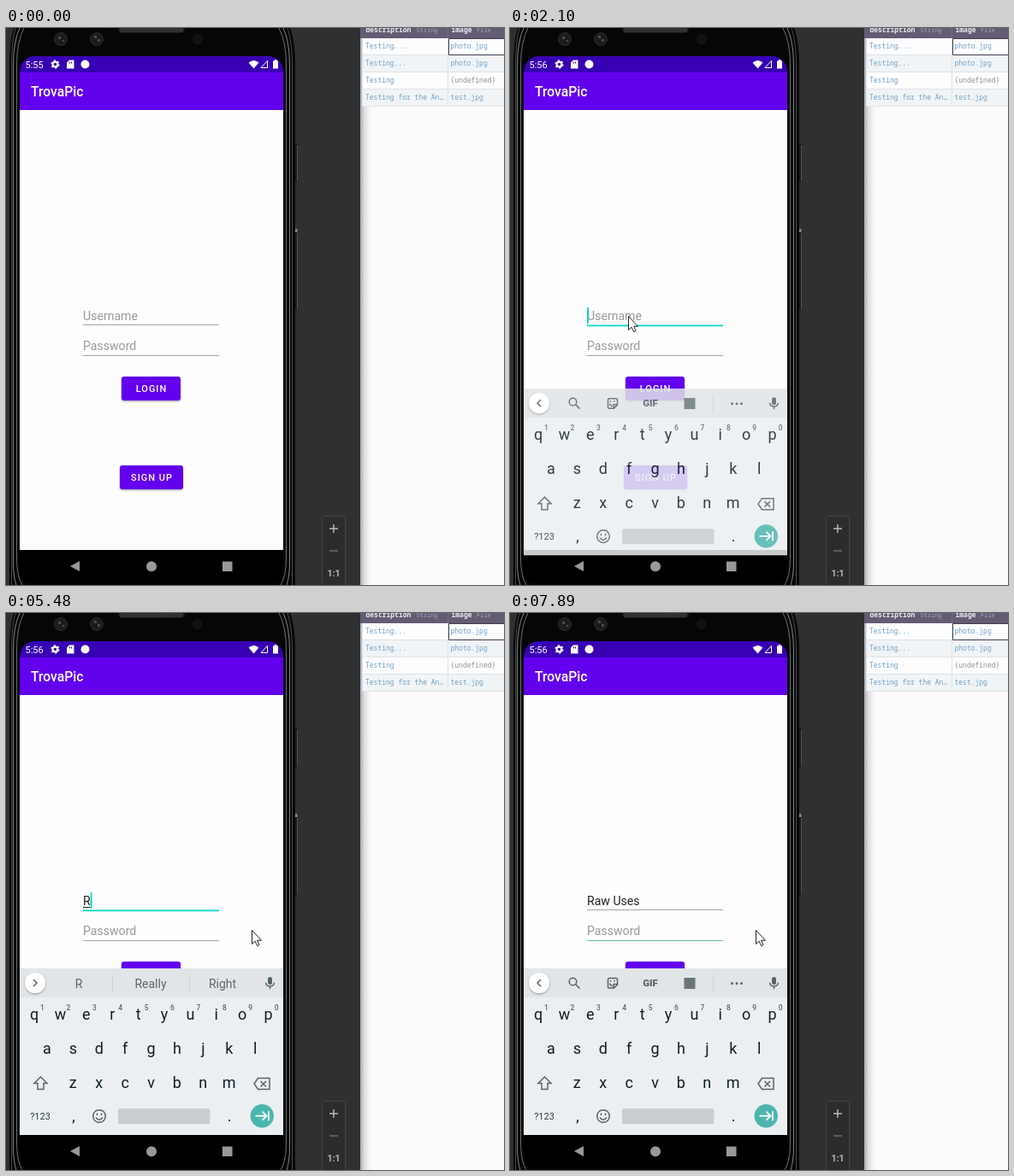
Write an HTML page that moves like this. It is 582 by 652 pixels and loops after 8 s.

```html
<!DOCTYPE html>
<html lang="en">
<head>
<meta charset="utf-8">
<title>Login screen</title>
<style>
html, body { margin: 0; width: 100%; height: 100%; overflow: hidden; background: #2f3032; }
svg { display: block; width: 582px; height: 652px; font-family: Roboto, sans-serif; }
text { white-space: pre; }
.mono { font: 500 8px "Noto Sans Mono", monospace; fill: #6f9fc4; }
.field { font-size: 14.1px; fill: #999; }
.button { font-size: 11px; font-weight: 500; letter-spacing: .98px; fill: #fff; text-anchor: middle; }
.key { font-size: 18px; fill: #0f1e27; text-anchor: middle; }
.digit { font-size: 8.5px; font-weight: 500; fill: #59646b; text-anchor: middle; }
.word { font-size: 14px; fill: #5b666d; text-anchor: middle; }
.line { fill: none; stroke: #57636a; stroke-width: 1.5; }
</style>
</head>
<body>
<svg viewBox="0 0 582 652">
  <defs>
    <linearGradient id="edge">
      <stop offset="0" stop-color="#aeacaf"/><stop offset=".4" stop-color="#e3e1e3"/>
      <stop offset="1" stop-color="#fcfafb"/>
    </linearGradient>
    <filter id="shadow" x="-10%" y="-20%" width="120%" height="160%">
      <feDropShadow dx="0" dy="1.2" stdDeviation="1" flood-opacity=".35"/>
    </filter>
    <pattern id="mesh" width="3" height="3" patternUnits="userSpaceOnUse">
      <path fill="#4a4a4a" d="M0 0h1.4v1.4H0zM1.5 1.5h1.4v1.4H1.5z"/>
    </pattern>
  </defs>

  <!-- Phone body -->
  <path fill="#191a1b" d="M338 135h3v45h-3zM338 235h3v95h-3z"/>
  <path fill="#8a8b8c" d="M338 235h2.5v4h-2.5z"/>
  <path fill="#555" d="M340 137h1v42h-1zM340 240h1v89h-1z"/>
  <path fill="#060606" d="M9 0Q4 16 4 44V652H338V44Q338 16 332 0Z"/>
  <g fill="none">
    <path stroke="#4b4c4d" d="M11 0Q6.500 16 6.500 44V652M329 0Q334.500 16 334.500 44V652"/>
    <path stroke="#858687" d="M16 0Q8.500 16 8.500 44V625Q8.500 642 12 652M324 0Q331.500 16 331.500 44V625Q331.500 642 328 652"/>
    <path stroke="#6c6d6e" d="M21 0Q12.500 16 12.500 44V620Q12.500 642 19 652M319 0Q327.500 16 327.500 44V620Q327.500 642 321 652"/>
  </g>
  <g fill="#1c1c1d" stroke="#2c2c2d">
    <circle cx="64" cy="13" r="7.500"/><circle cx="106" cy="13" r="7.500"/>
    <circle cx="224" cy="13" r="5.500" fill="#111" stroke="#161616"/>
  </g>
  <path fill="#4a4a4a" d="M61 10h3v3h-3zM66 14h2v2h-2zM103 9h3v3h-3zM107 13h3v3h-3z"/>
  <rect x="131" y="-6" width="78" height="12" rx="5" fill="#1b1b1b"/>
  <rect x="133" y="0" width="74" height="5" fill="url(#mesh)"/>

  <!-- App -->
  <path fill="#fefefe" d="M16 96H324V611H16z"/>
  <path fill="#3700b3" d="M16 52V51A18 18 0 0 1 34 33H306A18 18 0 0 1 324 51V52z"/>
  <path fill="#6200ee" d="M16 52H324V96H16z"/>
  <g fill="#fff">
    <text id="clock" x="22.500" y="46.700" font-size="11"></text>
    <circle cx="57.500" cy="42.500" r="2.800" fill="none" stroke="#fff" stroke-width="2.200"/>
    <circle cx="57.500" cy="42.500" r="4.500" fill="none" stroke="#fff" stroke-width="1.300" stroke-dasharray="2.300 2.412"/>
    <path fill-rule="evenodd" d="M74 37.500h5.500v10H71v-7zM74 39.500v2h1v-2zM76 39.500v2h1v-2z"/>
    <circle cx="92.500" cy="42.500" r="5"/>
    <path d="M283.500 40.500Q289.500 35.500 295.500 40.500L289.500 47.500z"/>
    <path fill="none" stroke="#fff" d="M298 46.500H305.500V38.500z"/>
    <path d="M312 38.500h1.500v-1.200h3v1.200H318v9h-6z"/>
    <text x="29" y="80.300" font-size="15.700" font-weight="500">TrovaPic</text>
  </g>
  <path id="userLine"/>
  <path id="passwordLine" d="M90 383H249v1H90z"/>
  <text id="user" class="field" x="90" y="342"></text>
  <text class="field" x="90" y="377">Password</text>
  <rect id="compose" y="344" height="1" fill="#222"/>
  <rect id="caret" width="1.800" height="19"/>
  <g fill="#6200ee" filter="url(#shadow)">
    <rect x="135" y="408" width="69" height="28" rx="3"/>
    <rect x="133" y="512" width="74" height="28" rx="3"/>
  </g>
  <text class="button" x="170" y="426">LOGIN</text>
  <text class="button" x="170.500" y="530">SIGN UP</text>

  <!-- Navigation bar -->
  <path d="M16 611H324V636Q324 650 310 650H30Q16 650 16 636z"/>
  <path fill="#97999b" d="M75 630L86 624V636zM253 624.500h11.500v11.500H253z"/>
  <circle cx="170" cy="630.300" r="6" fill="#97999b"/>

  <!-- Emulator zoom controls -->
  <rect x="369.500" y="571.500" width="27" height="90" rx="3" fill="#2b2c2d" stroke="#454647"/>
  <path stroke="#b9babb" stroke-width="1.500" d="M378 586H388M383 581V591"/>
  <path stroke="#6a6b6c" stroke-width="1.500" d="M378 612H388"/>
  <text x="383" y="641.500" font-size="10.500" font-weight="700" text-anchor="middle" fill="#b9babb">1:1</text>

  <!-- Data browser -->
  <path fill="#fcfafb" d="M414 0H582V652H414z"/>
  <path fill="#fdfdfe" d="M416 12H582V92H416z"/>
  <path fill="#f1f4f6" d="M416 32H582V52H416zM416 72H582V92H416z"/>
  <path fill="url(#edge)" d="M414 92h13V652h-13zM414 12h3v80h-3z"/>
  <path stroke="#dfe2e6" d="M416 31.500H582M416 51.500H582M416 71.500H582M416 91.500H582M416.500 12V92M516.500 12V92"/>
  <path fill="#635c73" d="M414 0H582V12H414z"/>
  <path stroke="#777085" d="M516.500 0V12"/>
  <path fill="none" stroke="#3f3e4c" d="M517.500 12.500H590V31.500H517.500z"/>
  <g id="table"></g>

  <!-- Keyboard -->
  <g id="keyboard">
    <path fill="#ebeff2" d="M16 416H324V611H16z"/>
    <path fill="#e1e5e8" d="M16 416H324V450H16z"/>
    <circle cx="34" cy="433" r="12" fill="#fff" filter="url(#shadow)"/>
    <path id="chevron" class="line" stroke-width="2"/>
    <g fill="#57636a">
      <rect x="306" y="426" width="5" height="9" rx="2.500"/>
      <path class="line" d="M303.500 432.500Q304 437 308.500 437T313.500 432.500M308.500 437V440"/>
    </g>
    <g id="tools">
      <circle class="line" cx="73.500" cy="431.500" r="4.300"/>
      <path class="line" d="M76.500 434.500L81.500 439.500M116 427.500h8q1.500 0 1.500 1.500v6l-4 4h-5.500q-1.500 0-1.500-1.500V429q0-1.500 1.500-1.500M125 434.500h-4v4M116.500 433.500q1 3 3 3M117.500 430v1.500M122 430v1.500"/>
      <text x="164" y="437" font-size="11.500" font-weight="900" text-anchor="middle" fill="#57636a">GIF</text>
      <rect x="203.500" y="427" width="13" height="13" fill="#6b767c"/>
      <path stroke="#cdd2d5" d="M237.500 424V443"/>
      <path stroke="#57636a" stroke-width="3" stroke-linecap="round" d="M259.500 433.500h0M265 433.500h0M270.500 433.500h0"/>
    </g>
    <g id="hints">
      <path stroke="#cdd2d5" d="M124.500 424V443M214.500 424V443"/>
      <text class="word" x="85" y="439"></text>
      <text class="word" x="169" y="439"></text>
      <text class="word" x="253" y="439"></text>
    </g>
    <g id="keys"></g>
    <path class="line" d="M40.500 543L48 550.500H44V557.500H37V550.500H33z"/>
    <path class="line" d="M294.500 544.500H308V557.500H294.500L290 551zM297.500 548L304 554.500M304 548L297.500 554.500"/>
    <text x="40" y="593" font-size="11" text-anchor="middle" fill="#2c3a42">?123</text>
    <circle class="line" cx="109" cy="589" r="7.300"/>
    <path class="line" d="M105 590.500Q109 596 113 590.500M106.500 585.500v2.500M111.500 585.500v2.500"/>
    <rect x="131" y="580" width="107.500" height="18" rx="2" fill="#c9cdd0"/>
    <circle cx="299.300" cy="588.700" r="13.700" fill="#4db6ac"/>
    <path fill="none" stroke="#fff" stroke-width="1.700" d="M291.500 588.700H304M299.500 583.700L304.500 588.700L299.500 593.700M307 583.200V594.200"/>
  </g>

  <path id="pointer" fill="#fff" stroke="#222" d="M.5.500V16.500L4.200 13.200L6.600 18.700L9 17.600L6.700 12.200H11.500z"/>
</svg>
<script>
const LOOP = 8000, STEP = 70, MOVE_START = 980;
const IDLE = "#a3a3a3", ACCENT = "#03d6c0";
const $ = id => document.getElementById(id);

function addText(parent, content, x, y, className, extra = {}) {
  const el = document.createElementNS("http://www.w3.org/2000/svg", "text");
  el.textContent = content;
  for (const [k, v] of Object.entries({ x, y, class: className, ...extra })) el.setAttribute(k, v);
  parent.append(el);
}

function buildTable() {
  const table = $("table");
  const light = { style: "fill:#eceaf0;font-weight:700" };
  const dim = { style: "fill:#a9a3b6;font-size:7px;font-weight:400" };
  addText(table, "description", 420.5, 5, "mono", light);
  addText(table, "String", 479.5, 4.5, "mono", dim);
  addText(table, "image", 520.5, 5, "mono", light);
  addText(table, "File", 550, 4.5, "mono", dim);
  const rows = [["Testing...", "photo.jpg"], ["Testing...", "photo.jpg"],
    ["Testing", "(undefined)"], ["Testing for the An…", "test.jpg"]];
  rows.forEach(([description, image], i) => {
    const y = 24.3 + i * 20;
    addText(table, description, 420, y, "mono");
    addText(table, image, 519.5, y, "mono",
      image[0] === "(" ? { style: "fill:#8f959b;font-weight:400" } : {});
  });
}

function buildKeys() {
  const keys = $("keys"), pitch = 30.4;
  [["qwertyuiop", 33, 476], ["asdfghjkl", 48, 516], ["zxcvbnm", 78.3, 556]].forEach(([row, x, y], r) => {
    [...row].forEach((letter, i) => {
      addText(keys, letter, x + i * pitch, y, "key");
      if (r === 0) addText(keys, (i + 1) % 10, x + 9.5 + i * pitch, 464.5, "digit");
    });
  });
  addText(keys, ",", 79, 595, "key");
  addText(keys, ".", 261, 595, "key");
}

// [time, typed text, suggestions]
const typing = [
  [0, ""],
  [3730, "R", "R Really Right"],
  [4070, ""],
  [5480, "R", "R Really Right"],
  [5560, "Ra", "Ra Rather Rain"],
  [5640, "Raw", "Raw Raws Rawer"],
  [5740, "Raw ", "data food and"],
  [5870, "Raw U", "U Update Unit"],
  [6070, "Raw Us", "Us Use Used"],
  [6140, "Raw Use", "Use Used Useful"],
  [6210, "Raw Uses", "Uses Used Useless"],
  [6670, "Raw Uses ", "and for another"],
  [7090, "Raw Uses", "Uses Used Useless"],
  [7350, "Raw Uses"]
];
const focusAt = 1890, passwordAt = 7350;
const caretOff = [[0, focusAt], [2450, 2980], [3460, 3730], [4550, 5080], [7890, LOOP]];

// [time, x, y]
const path = [[980, 487, 433], [1470, 137, 356], [1750, 138, 337], [2170, 138, 337], [2590, 266, 382], [2650, 287, 371]];

function pointerAt(t) {
  const next = path.findIndex(p => p[0] > t);
  if (next < 0) return path.at(-1).slice(1);
  const [t0, x0, y0] = path[next - 1], [t1, x1, y1] = path[next];
  const u = (t - t0) / (t1 - t0), k = u * u * (3 - 2 * u);
  return [x0 + (x1 - x0) * k, y0 + (y1 - y0) * k];
}

const show = (id, on) => $(id).style.display = on ? "" : "none";

function drawField(t) {
  const [, text, words] = typing.findLast(s => s[0] <= t);
  const inUser = t >= focusAt && t < passwordAt;
  const user = $("user");
  user.textContent = text || "Username";
  user.style.fill = text ? "#222" : "";
  $("userLine").setAttribute("d", inUser ? "M90 347.600H249v1.600H90z" : "M90 347H249v1H90z");
  $("userLine").setAttribute("fill", inUser ? ACCENT : IDLE);
  $("passwordLine").setAttribute("fill", t >= passwordAt ? "#66b8ae" : IDLE);

  const width = n => n ? user.getSubStringLength(0, n) : 0;
  const wordStart = text.lastIndexOf(" ") + 1;
  const composing = words && wordStart < text.length;
  show("compose", composing);
  if (composing) {
    $("compose").setAttribute("x", 90 + width(wordStart));
    $("compose").setAttribute("width", width(text.length) - width(wordStart));
  }

  const caret = $("caret");
  show("caret", !caretOff.some(([from, to]) => t >= from && t < to));
  caret.setAttribute("x", 90 + (inUser ? width(text.length) : 0));
  caret.setAttribute("y", inUser ? 327 : 362);
  caret.setAttribute("fill", t >= 4140 && t < 4550 ? "#068f7c" : ACCENT);

  show("tools", !words);
  show("hints", words);
  $("chevron").setAttribute("d", words ? "M32 429L36 433L32 437" : "M36 429L32 433L36 437");
  if (words) {
    const labels = $("hints").querySelectorAll("text");
    words.split(" ").forEach((word, i) => labels[i].textContent = word);
  }
}

function draw(t) {
  const stepped = MOVE_START + Math.floor((t - MOVE_START) / STEP) * STEP;
  $("clock").textContent = t < 1120 ? "5:55" : "5:56";
  drawField(t);

  const rest = 1 - Math.min(1, Math.max(0, (stepped - 1982) / 250));
  $("keyboard").setAttribute("opacity", 1 - rest ** 3);
  $("keyboard").setAttribute("transform", `translate(0 ${22 * rest ** 2})`);

  show("pointer", t >= MOVE_START);
  if (t >= MOVE_START) {
    const [x, y] = pointerAt(t >= 2650 ? t : stepped).map(Math.round);
    $("pointer").setAttribute("transform", `translate(${x} ${y})`);
  }
}

buildTable();
buildKeys();
const start = performance.now();
function tick() {
  draw((performance.now() - start) % LOOP);
  requestAnimationFrame(tick);
}
tick();
</script>
</body>
</html>
```
